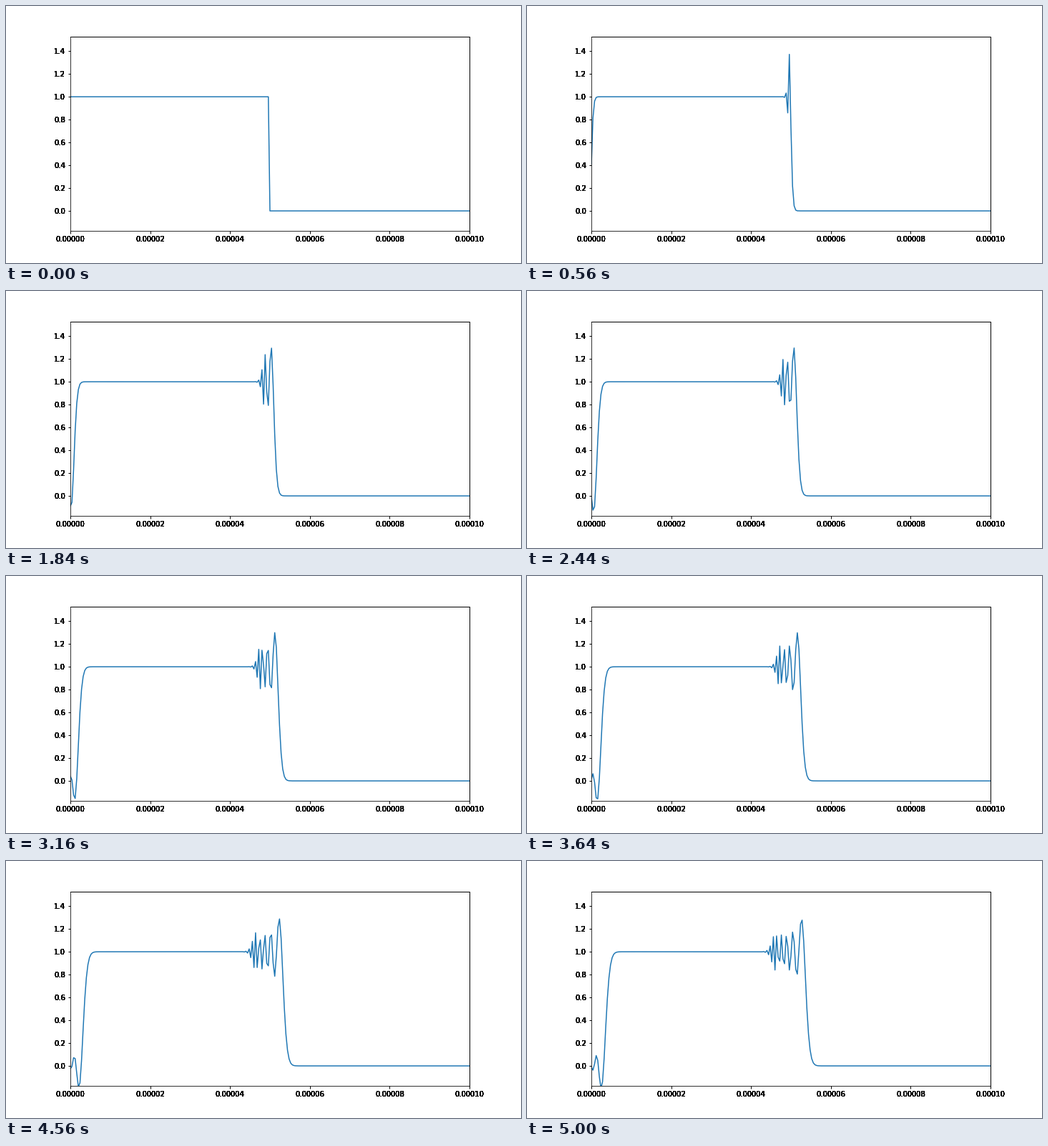
Write a matplotlib script that moves like this. It is 720 by 360 pixels and loops after 5.04 s.

```python
import numpy as np
import matplotlib.pyplot as plt
from matplotlib.animation import FuncAnimation
from matplotlib.axes import Axes

FRAMES = 126
INTERVAL = 40
CELLS = 250
LENGTH = 1e-4
COURANT = 0.09    # cells travelled per frame
INK_PASSES = 12   # repeated text drawing gives the heavy, jagged labels


class InkAxes(Axes):
    """Axes whose tick labels are inked several times over."""

    def draw(self, renderer):
        super().draw(renderer)
        labels = self.get_xticklabels() + self.get_yticklabels()
        for label in labels:
            for _ in range(INK_PASSES):
                label.draw(renderer)


def step_matrix(n, courant):
    """Exact one-frame propagator of central-difference advection."""
    rate = courant / 2 * (np.eye(n, k=-1) - np.eye(n, k=1))
    total = term = np.eye(n)
    for order in range(1, 10):
        term = term @ rate / order
        total = total + term
    return total


def solve():
    """Advect a step profile; the value outside the domain is zero."""
    n = CELLS + 1
    step = step_matrix(n, COURANT)
    u = np.where(np.arange(n) < CELLS // 2, 1.0, 0.0)
    history = [u]
    for _ in range(FRAMES - 1):
        u = step @ u
        history.append(u)
    return history


x = np.linspace(0, LENGTH, CELLS + 1)
profiles = solve()

plt.rcParams.update({"font.family": "DejaVu Sans", "font.size": 10})
fig = plt.figure(figsize=(10, 5), dpi=72, facecolor="white")
fig.subplots_adjust(left=0.125, right=0.9, bottom=0.125, top=0.88)
ax = fig.add_subplot(axes_class=InkAxes)
ax.set_xlim(0, LENGTH)
ax.set_ylim(-0.175, 1.525)
ax.set_xticks(np.linspace(0, LENGTH, 6))
ax.set_yticks(np.arange(8) * 0.2)
ax.xaxis.set_major_formatter("{x:.5f}")
ax.yaxis.set_major_formatter("{x:.1f}")
ax.tick_params(width=1)
for side in ("top", "right"):
    ax.spines[side].set_linewidth(1)

line, = ax.plot(x, profiles[0], color="#1f77b4", lw=1.5)


def update(i):
    line.set_ydata(profiles[i])
    return line,


anim = FuncAnimation(fig, update, frames=FRAMES, interval=INTERVAL,
                     repeat=True, repeat_delay=0, blit=False)
plt.show()
```
